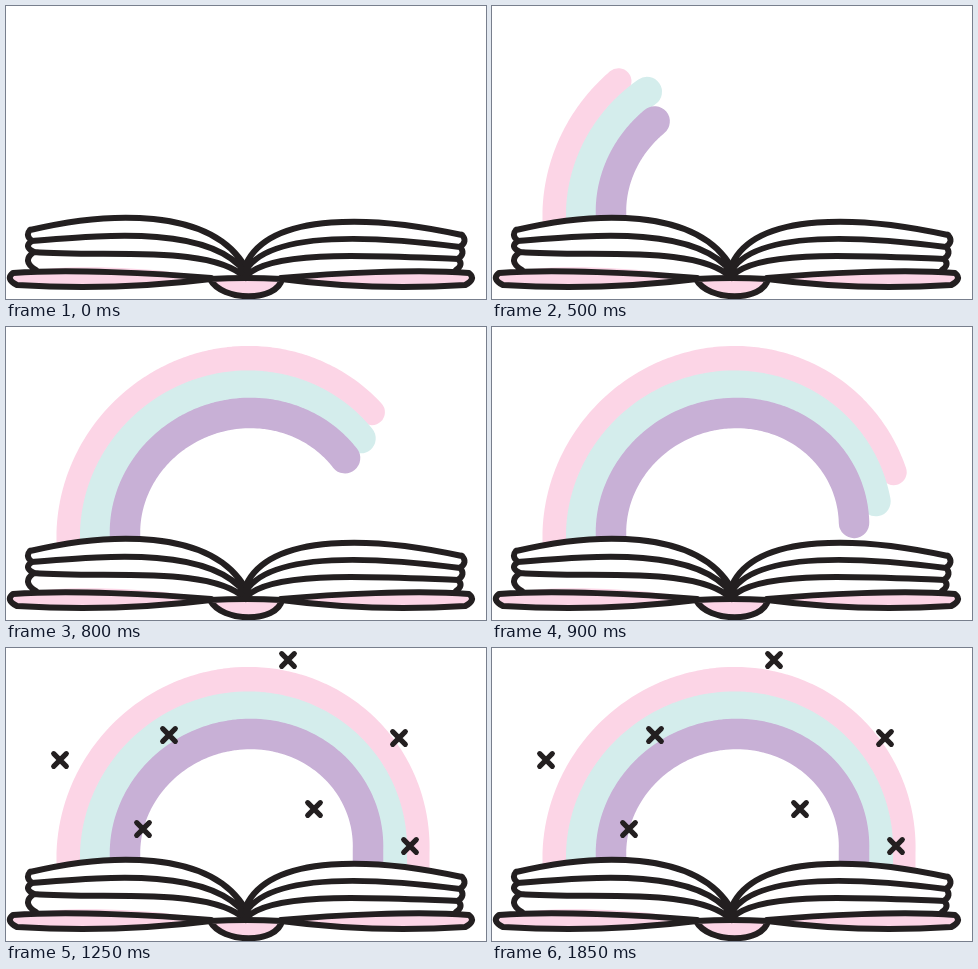
Animation of 480 by 293 pixels, one loop 2000 ms. Source, as an HTML page with a canvas:

```html
<!DOCTYPE html>
<html lang="en">
<head>
<meta charset="utf-8">
<title>Rainbow book</title>
<style>
  html, body { margin: 0; width: 100%; height: 100%; overflow: hidden; background: #fff; }
  canvas { display: block; width: 100vw; height: 100vh; }
</style>
</head>
<body>
<canvas id="stage" width="480" height="293"></canvas>
<script>
const ctx = document.getElementById('stage').getContext('2d');
const LOOP = 2000;
const INK = '#231f20', PINK = '#fcd5e6', MINT = '#d4edec', LILAC = '#c8b0d6';
const lerp = (a, b, u) => a + (b - a) * u;

// Each band sweeps along a half ellipse; sweep holds its angle at KEYS.
const KEYS = [300, 600, 800, 900];
const bands = [
  { color: PINK, cx: 237, cy: 205, rx: 173.5, ry: 173, width: 26, sweep: [1, 74, 137, 160] },
  { color: MINT, cx: 237.5, cy: 205, rx: 148.5, ry: 146.5, width: 30, sweep: [3, 82, 141, 168] },
  { color: LILAC, cx: 240.5, cy: 202, rx: 121.5, ry: 116, width: 30.5, sweep: [0, 74, 143, 177] }
];
const LEAN = 0.016;

const stars = [[54, 112], [163, 87], [137, 181], [282, 12], [393, 90], [308, 161], [404, 198]];
const STAR = 6.3;

// Outer edge, curve controls and spine end of the top page, with the step per page
const left = {
  dir: -1, edge: 24, start: [224, 11], c1: [100, 206, 23], c2: [205, 200, 19], end: [262, 5],
  cover: { inner: 205, outer: 7, lift: 6 }
};
const right = {
  dir: 1, edge: 456, start: [229, 12], c1: [370, 210, 20], c2: [265, 205, 19], end: [258, 6],
  cover: { inner: 275, outer: 463, lift: 0 }
};

const edgeX = (s, k) => s.edge - s.dir * -2 * s.dir * s.dir * (s.dir < 0 ? 1 : -1) * k * s.dir;
const edgeY = (s, k) => k < 3 ? s.start[0] + s.start[1] * k : 264;

function pageCurve(s, k) {
  ctx.moveTo(edgeX(s, k), edgeY(s, k));
  ctx.bezierCurveTo(
    s.c1[0], s.c1[1] + s.c1[2] * k,
    s.c2[0], s.c2[1] + s.c2[2] * k,
    240, s.end[0] + s.end[1] * k);
}

// Rounded fore-edge between neighbouring pages
function pageEdge(s, k) {
  const y0 = edgeY(s, k), y1 = edgeY(s, k + 1);
  ctx.moveTo(edgeX(s, k), y0);
  ctx.quadraticCurveTo(edgeX(s, k) + s.dir * (s.dir < 0 ? 5 + 4 * k : 6), (y0 + y1) / 2,
    edgeX(s, k + 1), y1);
}

function coverShape({ inner, outer }, lift) {
  const x = u => lerp(inner, outer, u);
  ctx.moveTo(inner, 272);
  ctx.bezierCurveTo(x(0.28), 267 - lift, x(0.73), 263 - lift, outer, 267);
  ctx.quadraticCurveTo(x(1.04), 273, x(0.98), 279);
  ctx.bezierCurveTo(x(0.64), 283, x(0.28), 280, inner, 273);
}

function spineShape() {
  ctx.moveTo(204, 273);
  ctx.bezierCurveTo(216, 296, 271, 296, 276, 273);
  ctx.quadraticCurveTo(240, 271, 204, 273);
}

function fill(color, shape) {
  ctx.beginPath();
  shape();
  ctx.fillStyle = color;
  ctx.fill();
}

function ink(width, shape) {
  ctx.beginPath();
  shape();
  ctx.strokeStyle = INK;
  ctx.lineWidth = width;
  ctx.stroke();
}

function drawBook() {
  for (const s of [left, right]) {
    fill('#fff', () => {
      pageCurve(s, 0);
      ctx.lineTo(240, 272);
      ctx.lineTo(s.cover.inner, 272);
      ctx.lineTo(edgeX(s, 3), 266);
    });
    fill(PINK, () => coverShape(s.cover, s.cover.lift));
  }
  fill(PINK, spineShape);
  for (const s of [left, right]) {
    ink(6, () => {
      for (let k = 0; k < 3; k++) {
        pageCurve(s, k);
        pageEdge(s, k);
      }
      coverShape(s.cover, 0);
    });
  }
  ink(6, spineShape);
}

function sweepAt(sweep, t) {
  if (t >= 1000) return 180;
  let i = 0;
  while (i < KEYS.length - 2 && t >= KEYS[i + 1]) i++;
  return lerp(sweep[i], sweep[i + 1], (t - KEYS[i]) / (KEYS[i + 1] - KEYS[i]));
}

function drawBand(b, t) {
  const sweep = sweepAt(b.sweep, t), steps = 90;
  ctx.beginPath();
  ctx.moveTo(b.cx - b.rx, 232);
  for (let i = 0; i <= steps; i++) {
    const a = sweep * i / steps * Math.PI / 180;
    const r = 1 - LEAN * Math.sin(2 * a);
    ctx.lineTo(b.cx - b.rx * r * Math.cos(a), b.cy - b.ry * r * Math.sin(a));
  }
  if (sweep === 180) ctx.lineTo(b.cx + b.rx, 232);
  ctx.strokeStyle = b.color;
  ctx.lineWidth = b.width;
  ctx.stroke();
}

function drawStar([x, y], turned) {
  ctx.save();
  ctx.translate(x, y);
  if (turned) ctx.rotate(Math.PI / 4);
  ink(5.2, () => {
    for (const d of [-1, 1]) {
      ctx.moveTo(-STAR, -STAR * d);
      ctx.lineTo(STAR, STAR * d);
    }
  });
  ctx.restore();
}

function render(time) {
  const t = Math.floor(time / 100) * 100;
  ctx.fillStyle = '#fff';
  ctx.fillRect(0, 0, 480, 293);
  ctx.lineCap = ctx.lineJoin = 'round';
  if (t >= 300) bands.forEach(b => drawBand(b, t));
  drawBook();
  if (time >= 1100) {
    const turned = Math.floor((time - 1100) / 150) % 2 === 0;
    stars.forEach(s => drawStar(s, turned));
  }
}

const start = performance.now();
function loop() {
  render((performance.now() - start) % LOOP);
  requestAnimationFrame(loop);
}
loop();
</script>
</body>
</html>
```
